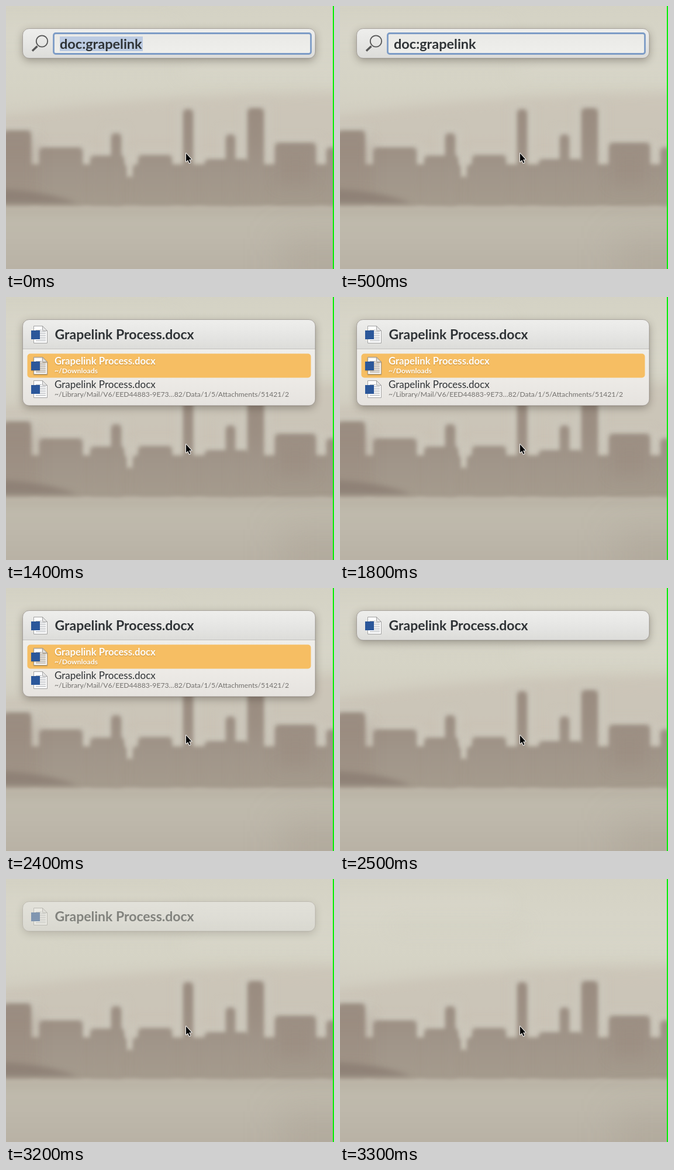
An HTML page with a canvas for the animation above (3.5 s loop, 561 px wide and 448 px high).

```html
<!DOCTYPE html>
<html lang="en">
<head>
<meta charset="utf-8">
<title>Document search</title>
<style>
  html, body { margin: 0; width: 100%; height: 100%; overflow: hidden; background: #cbc5b8; }
  canvas { display: block; }
</style>
</head>
<body>
<canvas id="stage" width="561" height="448"></canvas>
<script>
const W = 561, H = 448, LOOP = 3500;
const HORIZON = 340, BAR_HEIGHT = 50.5, LIST_HEIGHT = 146.5;
const ROW_TOP = 97, ROW_HEIGHT = 40;
const INK = '#2f3336';
const FILE = 'Grapelink Process.docx';
const ctx = document.getElementById('stage').getContext('2d');

function gradient(c, y0, y1, ...colors) {
  const g = c.createLinearGradient(0, y0, 0, y1);
  colors.forEach((color, i) => g.addColorStop(i / (colors.length - 1), color));
  return g;
}

function fillRect(c, color, x, y, w, h) {
  c.fillStyle = color;
  c.fillRect(x, y, w, h);
}

function roundRect(c, x, y, w, h, r) {
  c.beginPath();
  c.roundRect(x, y, w, h, r);
}

function label(c, text, x, y, size, color, weight = 400) {
  c.font = `${weight} ${size}px Lato, sans-serif`;
  c.fillStyle = color;
  c.fillText(text, x, y);
}

function blurred(c, radius, alpha, draw) {
  c.save();
  c.filter = `blur(${radius}px)`;
  c.globalAlpha = alpha;
  draw();
  c.restore();
}

function layerOf(paint, ...args) {
  const layer = document.createElement('canvas');
  layer.width = W;
  layer.height = H;
  paint(layer.getContext('2d'), ...args);
  return layer;
}

// Key buildings: left, right, roof
const buildings = [
  [-40, 41, 214], [59, 129, 243], [146, 200, 257], [182, 195, 219],
  [228, 282, 256], [305, 318, 178], [342, 414, 263], [378, 390, 221],
  [415, 439, 176], [462, 528, 235], [550, 600, 243]
];

function paintCity(c) {
  c.fillStyle = gradient(c, 176, HORIZON, '#9a8c80', '#9c8f83', '#a1968a', '#a59b8d');
  c.fillRect(-40, 272, 163, HORIZON - 272);
  c.fillRect(122, 272, 82, HORIZON - 272);
  c.fillRect(203, 293, 17, HORIZON - 293);
  c.fillRect(219, 272, 400, HORIZON - 272);
  for (const [left, right, roof] of buildings) c.fillRect(left, roof, right - left, HORIZON - roof);
}

function paintBackdrop(c) {
  fillRect(c, gradient(c, 0, HORIZON, '#d4d2c4', '#d7d5c8', '#d5d3c5', '#d1cdc0', '#cdc7bb', '#cbc4b8'), 0, 0, W, H);

  blurred(c, 14, 0.5, () => {
    fillRect(c, '#dcdace', -40, 32, 330, 22);
    fillRect(c, '#dcdace', 300, 100, 300, 18);
    fillRect(c, '#d0cdbd', 90, 76, 230, 10);
  });
  blurred(c, 9, 0.85, () => {
    c.beginPath();
    c.moveTo(-40, 194);
    c.quadraticCurveTo(240, 146, 610, 148);
    c.lineTo(610, 350);
    c.lineTo(-40, 350);
    c.fillStyle = '#cbc3b7';
    c.fill();
  });

  // Pale glow hugging the roofs
  blurred(c, 8, 0.75, () => {
    c.fillStyle = '#cdc9bc';
    for (const [left, right, roof] of buildings) c.fillRect(left - 12, roof - 10, right - left + 24, HORIZON - roof);
  });

  blurred(c, 4.3, 1, () => c.drawImage(layerOf(paintCity), 0, 0));
  blurred(c, 4.3, 1, () => paintCity(c));
  blurred(c, 12, 0.25, () => {
    fillRect(c, '#927f75', -40, 232, 95, 90);
    fillRect(c, '#927f75', 465, 255, 60, 50);
  });
  blurred(c, 5, 0.7, () => {
    c.beginPath();
    c.moveTo(-30, 311);
    c.quadraticCurveTo(60, 312, 122, 336);
    c.lineTo(-30, 336);
    c.fillStyle = '#887970';
    c.fill();
  });

  blurred(c, 4, 1, () => {
    fillRect(c, gradient(c, HORIZON, H, '#b8b1a3', '#bfbaac', '#beb8ab', '#bbb5a8', '#b9b2a5'), -30, HORIZON + 2, 640, 150);
  });
  blurred(c, 30, 0.3, () => fillRect(c, '#a3988b', 470, 395, 150, 90));

  fillRect(c, '#00f000', W - 2, 0, 2, H);
}

function paintPanel(c, height) {
  c.save();
  c.shadowColor = 'rgba(50, 42, 34, 0.36)';
  c.shadowBlur = 14;
  c.shadowOffsetY = 4;
  roundRect(c, 28.5, 38.5, 500.5, height, 11);
  c.fillStyle = '#ecebe8';
  c.fill();
  c.restore();

  c.save();
  c.clip();
  fillRect(c, gradient(c, 39, 89, '#eeeeec', '#e6e6e4', '#dcdcd9'), 28, 38, 502, 51);
  if (height > BAR_HEIGHT) {
    fillRect(c, gradient(c, 89, 185, '#efeeea', '#edebe7', '#e6e3df'), 28, 89, 502, 100);
    fillRect(c, '#c2c1be', 28, 88, 502, 1);
  }
  c.restore();

  c.strokeStyle = 'rgba(95, 88, 80, 0.45)';
  c.lineWidth = 1;
  c.stroke();
}

function paintFileIcon(c, top) {
  c.save();
  c.translate(43, top);
  c.lineWidth = 0.9;
  c.strokeStyle = '#9a9a9a';
  c.fillStyle = '#fdfdfd';
  const page = new Path2D('M4.5 .5H19.5L27.5 8.5V29.5H4.5Z');
  c.fill(page);
  c.stroke(page);
  const fold = new Path2D('M19.5 .5L27.5 8.5H19.5Z');
  c.fillStyle = '#e6e6e6';
  c.fill(fold);
  c.stroke(fold);
  for (let y = 7; y < 27; y += 3) fillRect(c, '#a9adb3', 8, y, y < 10 ? 10 : 17, 1);
  fillRect(c, '#2b579a', 0, 8, 15, 15);
  c.restore();
}

function paintSearch(c, selected) {
  paintPanel(c, BAR_HEIGHT);

  c.strokeStyle = '#565656';
  c.lineWidth = 1.8;
  c.beginPath();
  c.arc(61.5, 60, 9.7, 0, Math.PI * 2);
  c.stroke();
  c.lineWidth = 3.4;
  c.beginPath();
  c.moveTo(53.5, 68.5);
  c.lineTo(45, 76.5);
  c.stroke();

  roundRect(c, 81.5, 46.5, 440, 35, 3.5);
  c.fillStyle = gradient(c, 46, 82, '#e9e9e6', '#efefec');
  c.fill();
  c.strokeStyle = '#7d9cc6';
  c.lineWidth = 2.8;
  c.stroke();

  if (selected) fillRect(c, '#bccbe2', 92, 52, 142, 25);
  label(c, 'doc:grapelink', 92, 73, 23.5, INK, 700);
}

function paintCollapsed(c, height = BAR_HEIGHT) {
  paintPanel(c, height);
  paintFileIcon(c, 49);
  label(c, FILE, 83.5, 72, 23, INK, 700);
}

function paintRow(c, index, path, titleColor, pathColor, weight) {
  const top = ROW_TOP + index * ROW_HEIGHT;
  paintFileIcon(c, top + 5);
  label(c, FILE, 83, top + 18, weight > 400 ? 16.7 : 17, titleColor, weight);
  label(c, path, 83, top + 33, 12.2, pathColor, weight);
}

function paintResults(c) {
  paintCollapsed(c, LIST_HEIGHT);

  roundRect(c, 36.5, ROW_TOP - 0.5, 485, ROW_HEIGHT + 1, 5);
  c.fillStyle = '#f6be63';
  c.fill();
  c.save();
  c.shadowColor = 'rgba(130, 80, 0, 0.4)';
  c.shadowBlur = 1.5;
  c.shadowOffsetY = 1;
  paintRow(c, 0, '~/Downloads', '#fff', '#fff', 700);
  c.restore();
  paintRow(c, 1, '~/Library/Mail/V6/EED44883-9E73…82/Data/1/5/Attachments/51421/2', INK, '#74726f', 400);
}

function paintPointer(c) {
  const arrow = new Path2D('M308 251V265L311.2 262.2L313.5 267.6L315.5 266.7L313.2 261.4H317.4Z');
  c.lineJoin = 'round';
  c.lineWidth = 1.8;
  c.strokeStyle = '#fff';
  c.stroke(arrow);
  c.fillStyle = '#000';
  c.fill(arrow);
}

const backdrop = layerOf(paintBackdrop);
const selected = layerOf(paintSearch, true);
const plain = layerOf(paintSearch, false);
const results = layerOf(paintResults);
const collapsed = layerOf(c => paintCollapsed(c));

// The selection blinks until the query is sent
function sceneAt(time) {
  if (time < 1100) return Math.floor(time / 500) % 2 ? plain : selected;
  if (time < 1400) return plain;
  if (time < 2500) return results;
  return time < 3300 ? collapsed : null;
}

function render(time) {
  const scene = sceneAt(time);
  ctx.drawImage(backdrop, 0, 0);
  if (scene) {
    ctx.globalAlpha = time < 3200 ? 1 : 0.5;
    ctx.drawImage(scene, 0, 0);
    ctx.globalAlpha = 1;
  }
  paintPointer(ctx);
}

const origin = performance.now();
function tick() {
  render((performance.now() - origin) % LOOP);
  requestAnimationFrame(tick);
}
tick();
</script>
</body>
</html>
```
